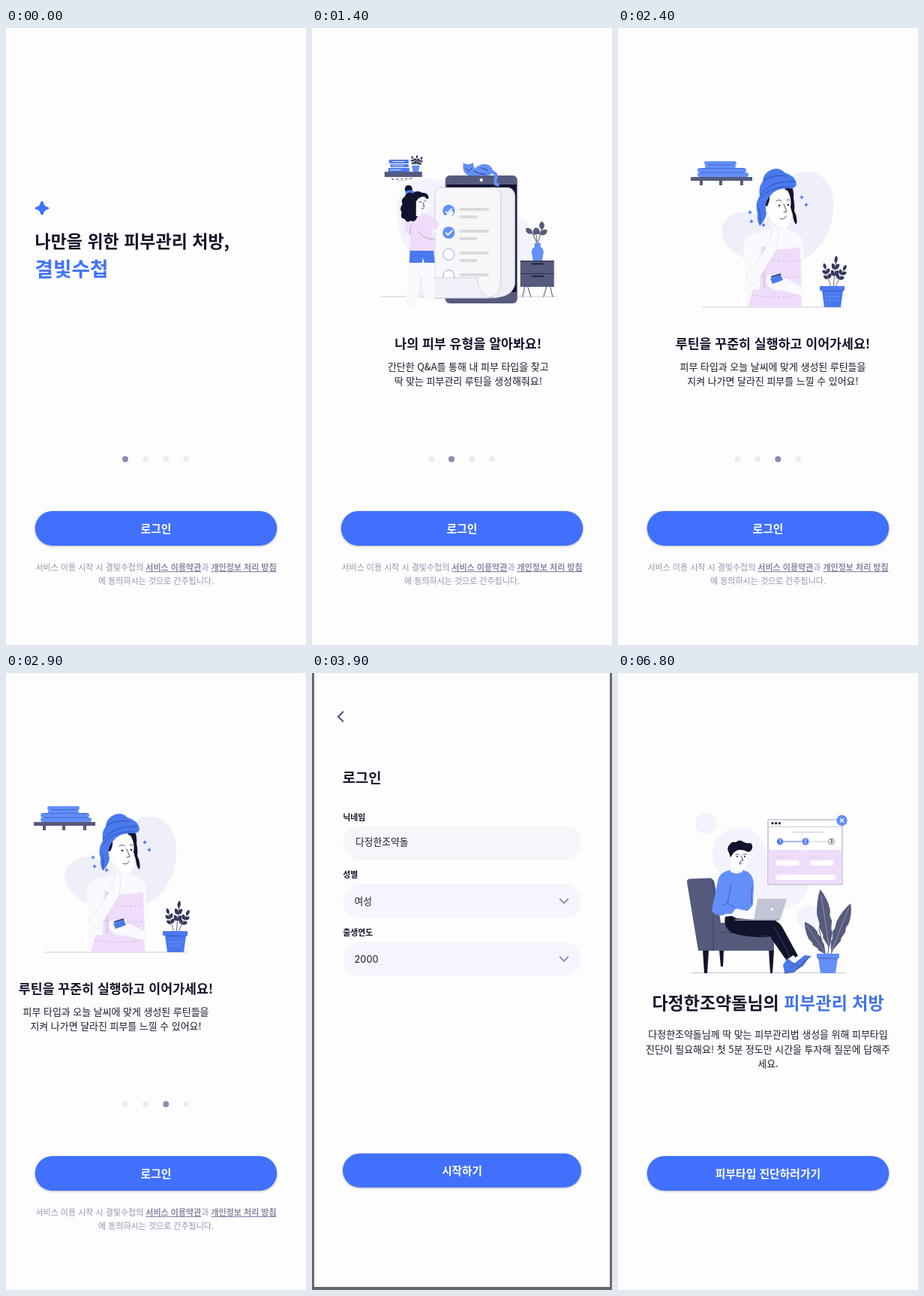
Recreate the animation shown at these times as an HTML page. Size 400 px wide and 820 px high, loop 7.9 s.

```html
<!DOCTYPE html>
<html lang="ko">
<head>
<meta charset="utf-8">
<style>
html, body { margin: 0; width: 100%; height: 100%; overflow: hidden; background: #fdfdfd }
svg { display: block; width: 100%; height: 100% }
text { font: 12.95px "Noto Sans CJK KR", "Noto Sans CJK", sans-serif; fill: #1b1b2e }
.mid text, .btn text { text-anchor: middle }
text.big { font-size: 23px; font-weight: 700; fill: #14142b }
text.brand { font-size: 26.6px; font-weight: 700; fill: #4173fb }
text.head { font-size: 17.3px; font-weight: 700; fill: #14142b }
text.label { font-size: 11px; font-weight: 700; fill: #14142b }
text.num { font-family: Inter, sans-serif }
.step text { font: 700 6px Inter, sans-serif }
.terms text { font-size: 11px; fill: #9294ad }
.terms tspan { font-weight: 700; text-decoration: underline; fill: #8688a6 }
.btn use { fill: #4171fc; filter: drop-shadow(0 1.5px 1.5px #0004) }
.btn text { font-size: 14.8px; font-weight: 700; fill: #fff }
.blue { fill: #638ffa } .royal { fill: #4a79ee } .slate { fill: #565a7d } .ink { fill: #10132b }
.pale { fill: #f2f3fc } .skin { fill: #f9f9fe } .lav { fill: #efdcfa } .white { fill: #fff }
.gray { fill: #d9d9de } .card { fill: #f7f7fa }
.line { fill: none; stroke: #b2b4c0; stroke-width: .7 }
.thin { fill: none; stroke: #22253f; stroke-width: .8; stroke-linecap: round; stroke-linejoin: round }
.edge { stroke: #b4b6c6; stroke-width: .6 }
.chev { fill: none; stroke: #8487b3; stroke-width: 1.8; stroke-linecap: round; stroke-linejoin: round }
#menu rect { fill: #f9f9fb; filter: drop-shadow(0 6px 9px #0007) }
</style>
</head>
<body>
<svg viewBox="0 0 400 820">
<defs>
  <path id="leaf" d="M0 0C-5 -3 -5 -8 0 -11C4 -8 4 -3 0 0"/>
  <g id="sprig">
    <path d="M0 0V-36" fill="none" stroke="#3d4163"/>
    <g fill="#34385a">
      <use href="#leaf" transform="translate(0 -34)"/>
      <use href="#leaf" transform="translate(0 -26) rotate(-48)"/><use href="#leaf" transform="translate(0 -26) rotate(48)"/>
      <use href="#leaf" transform="translate(0 -17) rotate(-52)"/><use href="#leaf" transform="translate(0 -17) rotate(52)"/>
    </g>
  </g>
  <g id="blade">
    <path class="slate" d="M0 0L-8 -12L-7 -15L-12 -24L-10 -27L-12 -36Q-10 -50 0 -62Q11 -50 11 -38L9 -34L11 -28L8 -20L9 -16Z"/>
    <path d="M0 0V-56" fill="none" stroke="#b9bccf" stroke-width=".6"/>
  </g>
  <path id="spark" d="M0 -3L1 -1L3 0L1 1L0 3L-1 1L-3 0L-1 -1Z" class="royal"/>
  <rect id="pill" x="38.700" y="642" width="322.600" height="46" rx="23"/>
</defs>

<g id="intro">
  <rect y="-22" width="400" height="844" fill="#fdfdfd"/>
  <g id="slides">
    <g>
      <path fill="#4173fb" d="M48 230C50 230 50.500 235 52 236C53 237.500 57.500 238 57.500 239.500C57.500 241 53 241.500 52 243C50.500 244 50 248.500 48 248.500C46 248.500 45.500 244 44 243C43 241.500 38.500 241 38.500 239.500C38.500 238 43 237.500 44 236C45.500 235 46 230 48 230"/>
      <text class="big" x="38.500" y="291.700">나만을 위한 피부관리 처방,</text>
      <text class="brand" x="38.500" y="330">결빛수첩</text>
    </g>

    <g class="mid" transform="translate(391.500)">
      <path class="pale" d="M114 245C112 200 150 195 180 205V310H150C125 305 115 275 114 245M274 254C292 250 298 285 291 309H274Z"/>
      <path class="line" d="M92 357H326"/>
      <path class="slate" d="M97 191h50v7h-50z"/>
      <path class="line" d="M104 198Q119 208 136 198"/>
      <path d="M108 201L134 200" stroke="#565a7d" stroke-width="2" stroke-dasharray="0 6" stroke-linecap="round"/>
      <path class="royal" d="M103 175h26v5h-26zM105 181h24v4h-24zM102 186h28v5h-28z"/>
      <path d="M107 177.500h17M108 183h15M105 188.500h14" stroke="#dfe4fb"/>
      <use href="#sprig" transform="translate(139 187) rotate(-18) scale(.4)"/><use href="#sprig" transform="translate(139 187) rotate(28) scale(.4)"/><use href="#sprig" transform="translate(139 187) rotate(5) scale(.4)"/>
      <path class="blue" d="M133 183h11l-2 8h-7z"/>

      <rect class="slate" x="178" y="196" width="96" height="170" rx="6"/>
      <path class="ink" d="M180 208H273V351H180Z"/>
      <circle class="white" cx="226" cy="202" r="2.200"/>
      <path class="edge" fill="#eeeef6" d="M240 212H262Q271 214 271 224V340Q268 358 240 359Z"/>
      <path class="card edge" d="M164 222Q164 212 174 212H244Q252 214 252 224V338Q252 356 234 359H164Z"/>
      <g class="gray">
        <path d="M197 239h39v4h-39zM197 249h23v4h-23zM197 268h39v4h-39zM197 278h23v4h-23zM197 297h39v4h-39zM197 307h23v4h-23zM197 326h39v4h-39z"/>
      </g>
      <circle class="blue" cx="182.500" cy="243" r="8"/><circle class="blue" cx="182.500" cy="272" r="8"/>
      <path d="M178.500 272l3 3 6-6M178 244l3 2 6-6" fill="none" stroke="#fff" stroke-width="1.800"/>
      <circle cx="182.500" cy="301" r="7.500" fill="#fff" stroke="#7c9df6" stroke-width=".9"/>
      <path d="M175.500 332A7.500 7.500 0 1 1 189.500 332" fill="#fff" stroke="#7c9df6" stroke-width=".9"/>
      <path class="edge" fill="#f0f0f8" d="M135 332H221V338Q224 355 240 359H150Q136 352 135 332Z"/>
      <path d="M240 191Q248 194 245 201Q243 208 248 208" fill="none" stroke="#638ffa" stroke-width="4.500" stroke-linecap="round"/>
      <path class="blue" d="M202 179l4 2h5l4-2 2 8C226 178 238 180 241 188Q242 195 234 196H209Q200 193 202 179"/>
      <path class="thin" d="M205 187l2 1M211 188l2-1M208 190h2M216 190Q224 195 232 194M226 186l8 3"/>

      <path class="thin" d="M284 344L281 357M288 344L292 357M313 344L309 357M318 344L321 357"/>
      <path class="slate" d="M278 309h45v35h-45z"/>
      <path d="M278 326.500h45M278 310h45" stroke="#2c2f4d"/>
      <path d="M293 313.500h16M293 330h16" stroke="#10132b" stroke-width="1.500"/>
      <path class="thin" d="M301 288L292 268M301 288L307 264M300 284L299 273"/>
      <g class="slate"><use href="#leaf" transform="translate(294 273) rotate(-50)"/><use href="#leaf" transform="translate(296 275) rotate(30)"/><use href="#leaf" transform="translate(305 275) rotate(55)"/><use href="#leaf" transform="translate(307 268)"/><use href="#leaf" transform="translate(304 274) rotate(-40)"/></g>
      <path class="blue" d="M297 286h8v5q4 2 4 7l-2 11h-12l-2-11q0-5 4-7z"/>

      <path class="skin" d="M131 308L125 364L127 371H141L140 365L146 320L151 361L163 364L164 308Z"/>
      <path class="royal" d="M131 293L130 312H147L148 305L150 312H164L162 293Z"/>
      <path class="lav" d="M131 248Q122 256 124 270L131 274V296H163L160 262L165 270L171 263Q160 246 151 247Z"/>
      <path class="skin" d="M163 270L170 262L176 250L183 246L187 242L189 246L178 260L168 274Z"/>
      <path class="thin" stroke-opacity=".35" d="M131 274Q130 268 133 262M141 270Q150 281 163 281"/>
      <path class="ink" d="M156 226Q155 218 147 219Q141 215 135 219Q126 217 124 224Q118 228 121 234Q116 240 120 245Q117 253 124 254Q127 260 132 256Q138 259 140 252Q146 245 140 237L150 229Z"/>
      <path class="skin" d="M139 231Q142 224 150 224Q154 226 155 236L154 244L146 245V250H139Z"/>
      <path class="thin" d="M143 231h3M150 230h2M148 232l2 5h-2M146 240q3 1 4-1"/>
      <circle class="ink" cx="129" cy="214" r="5"/><path d="M125 219q6-4 11 0" fill="none" stroke="#4a79ee" stroke-width="3"/>

      <text class="head" x="208.500" y="425.500">나의 피부 유형을 알아봐요!</text>
      <text x="208.500" y="454.800">간단한 Q&amp;A를 통해 내 피부 타입을 찾고</text>
      <text x="208.500" y="473.800">딱 맞는 피부관리 루틴을 생성해줘요!</text>
    </g>

    <g class="mid" transform="translate(793.500)">
      <path fill="#eeeff9" d="M214 225C222 180 282 178 287 228C291 276 259 311 228 312C185 316 142 305 138 270C140 242 178 236 196 258Z"/>
      <path class="line" d="M112 371H301"/>
      <path class="slate" d="M97 198h82v5H97zM109 203h4v6h-4zM135 203h4v6h-4zM163 203h4v6h-4z"/>
      <g class="blue"><rect x="106" y="192" width="68" height="6" rx="3"/><rect x="106" y="186" width="65" height="6" rx="3"/><rect x="116" y="181.500" width="41" height="5" rx="2.500"/><rect x="115" y="177" width="43" height="5" rx="2.500"/></g>
      <path d="M110 192h59M120 181.700h34M112 186.500h56" stroke="#3b5fc4" stroke-width=".8"/>

      <path class="skin" d="M171 371L168 290Q169 276 184 273L205 268V254H225V268L236 272Q247 276 247 290V371Z"/>
      <path class="lav" d="M191 289Q215 298 243 291L245 371H173L180 348H189Z"/>
      <g class="thin" stroke-opacity=".25"><path d="M190 305q25 8 54 3M186 328q20 6 58 2M178 354q30 8 66 0" stroke-dasharray="2 4"/><path d="M195 292v54"/></g>
      <path class="skin edge" d="M170 330Q178 342 184 340L211 296L214 270L208 259L204 276L198 290L184 312Z" stroke-opacity=".5"/>
      <path class="skin" d="M198 330Q210 325 222 332L246 344V356L220 349Q204 350 198 340Z"/>
      <path class="royal" d="M203 333l14-5 3 7-14 5z"/><path d="M204 331l13-4" stroke="#29408d" stroke-width="2"/>
      <path class="ink" d="M222 211L232 211Q235 218 234 226Q236 236 235 243Q240 252 238 261Q234 259 233 248L228 232Z"/>
      <path class="white" d="M199 221Q210 209 226 216Q232 226 230 238Q233 252 228 262Q222 267 214 263Q203 257 200 246Q192 249 193 238Q195 234 199 237Z"/>
      <path class="ink" d="M196 224L202 221Q203 229 199 237L194 236Z"/>
      <path class="thin" d="M211 230q4-3 7 0M225 229q3-2 4 0M221 234l4 10-4 1M216 253q5 3 8-3"/>
      <circle class="ink" cx="215" cy="236" r="1.200"/><circle class="ink" cx="227" cy="235" r="1.200"/>
      <path class="royal" d="M189 263Q185 255 186 246Q182 234 189 223Q187 211 193 204Q194 193 203 189Q214 184 222 192Q236 196 238 207Q237 214 228 213Q211 212 203 223Q194 233 198 246Q197 255 189 263Z"/>
      <path d="M189 222Q204 202 236 204M193 204Q205 194 224 197M190 226Q204 209 230 211M188 240Q191 252 189 261" fill="none" stroke="#2c4ba8" stroke-width=".9"/>
      <use href="#spark" x="176" y="245"/><use href="#spark" x="178" y="257"/><use href="#spark" x="194" y="262"/><use href="#spark" x="245" y="225"/><use href="#spark" x="251" y="235"/>

      <use href="#sprig" transform="translate(284 345) rotate(-16) scale(.62 .75)"/><use href="#sprig" transform="translate(287 345) rotate(6) scale(.62 .95)"/><use href="#sprig" transform="translate(289 345) rotate(27) scale(.62 .75)"/>
      <path class="royal" d="M269 343h33v6h-2l-3 22h-22l-3-22h-3z"/><path d="M272 349.500h28" stroke="#3559c0"/><path d="M277 357h18M278 362h16" stroke="#86a9ff" stroke-dasharray="2 2"/>

      <text class="head" x="206.500" y="425.500">루틴을 꾸준히 실행하고 이어가세요!</text>
      <text x="206.500" y="454.800">피부 타입과 오늘 날씨에 맞게 생성된 루틴들을</text>
      <text x="206.500" y="473.800">지켜 나가면 달라진 피부를 느낄 수 있어요!</text>
    </g>

    <g class="mid" transform="translate(1185)">
      <path class="pale" d="M208 208C210 143 304 140 314 205C318 250 295 290 274 320H150C115 310 110 245 150 233C180 228 196 244 208 208"/>
      <path class="line" d="M104 362H331"/>
      <path d="M269 241A26 26 0 1 1 278 250L266 249Q270 246 269 241" fill="#f6f6fd" stroke="#a0a2b2" stroke-width=".8"/>
      <path class="royal" d="M287 216q4-3 8 0l-2 18h-4z"/><circle class="royal" cx="291" cy="238.500" r="3"/>
      <circle cx="126" cy="247" r="12" fill="#f7f7fd" stroke="#737797" stroke-width="2.400"/>
      <path d="M122 247l3 4 5-9M113 237q2-4 6-4M133 233q5 1 6 5M111 252q1 4 4 6" fill="none" stroke="#565a7d" stroke-width="1.500"/>
      <path class="white edge" d="M129 249h40v44l-8-6h-32z"/><path class="royal" d="M129 247h40v14h-40z"/>
      <path d="M143 243v9M155 243v9" stroke="#8d90aa" stroke-width="3" stroke-linecap="round"/>
      <text x="149" y="279" style="font:800 17px Inter,sans-serif">17</text>

      <path class="blue" d="M154 362L166 330Q173 290 187 281Q200 274 215 277H240Q258 280 261 296L264 362Z"/>
      <path class="lav" d="M219 306L238 296L240 362H222Z"/>
      <path class="skin" d="M209 268L213 284L224 307L237 298L236 262Z"/>
      <path class="ink" d="M192 222C187 212 196 204 204 208C209 202 220 202 223 208C232 206 241 214 238 221C247 225 247 235 243 240C250 245 249 256 244 260C247 270 240 278 235 273Q229 276 225 268L200 266C199 278 190 281 186 276C178 281 172 271 178 264C172 256 176 248 179 245C173 235 179 226 185 226Q187 221 192 222Z"/>
      <path class="white" d="M193 231Q207 237 217 222Q220 232 227 237Q231 247 226 255Q223 273 210 273Q195 268 192 250Z"/>
      <path class="thin" d="M196 240q4-3 6 0M212 238q5-3 7 0M204 241l-3 11 4 1"/>
      <circle class="ink" cx="199" cy="244" r="1.500"/><circle class="ink" cx="215" cy="242" r="1.500"/><circle cx="211" cy="258" r="2.800" fill="#d9dae6" stroke="#22253f"/>
      <path class="skin" d="M236 286Q242 275 248 275Q256 276 258 281L259 289L263 295L253 298L247 293L239 296Z"/>
      <path class="thin" stroke-opacity=".5" d="M206 280L216 301M240 300L242 362M178 330Q178 348 166 358"/>
      <path d="M175 303q9-9 15 0t12-2M244 310q9-7 13 2M180 344q9-3 9-14" fill="none" stroke="#c8d7ff" stroke-width=".8"/>
      <rect class="ink" x="203" y="309" width="19" height="34" rx="3" transform="rotate(3 212 326)"/>
      <circle cx="207" cy="314" r="1.300" fill="#7b7f98"/>
      <path class="skin" d="M165 359L182 341L197 331L203 321L207 325L204 335L218 329L223 334L222 342L208 353L188 362H166Z"/>
      <path class="thin" stroke-opacity=".3" d="M208 338l14-7M208 343l14-5M207 347l12-4"/>
      <path class="edge" fill="#d7d8e8" d="M211 365H256L259 376H250Z"/>
      <path fill="#e9eaf6" stroke="#858799" stroke-width=".8" d="M262 321Q262 319 265 318.500L328 315Q331 315 330.500 318L322 371Q321 373 318 373.500L253 376.500Z"/>
      <circle class="white" cx="293.500" cy="344" r="3.200" stroke="#a5a7b9" stroke-width=".7"/>

      <text class="head" x="215" y="425.500">결빛수첩으로 습관을 들여요!</text>
      <text x="215" y="454.800">루틴 시간에 울리는 리마인더 알림으로 잊지 않고</text>
      <text x="215" y="473.800">루틴을 수행할 수 있도록 도와줘요.</text>
    </g>
  </g>
  <g id="dots"><circle cx="159" cy="573" r="4"/><circle cx="186" cy="573" r="4"/><circle cx="213.300" cy="573" r="4"/><circle cx="240.300" cy="573" r="4"/></g>
  <g class="btn"><use href="#pill"/><text x="200" y="670.500">로그인</text></g>
  <g class="mid terms">
    <text x="200" y="721">서비스 이용 시작 시 결빛수첩의 <tspan>서비스 이용약관</tspan>과 <tspan>개인정보 처리 방침</tspan></text>
    <text x="200" y="739">에 동의하시는 것으로 간주됩니다.</text>
  </g>
</g>

<rect class="scrim" width="400" height="820"/>
<g id="login">
  <rect y="-22" width="400" height="844" fill="#fdfdfd"/>
  <path class="chev" style="stroke:#4a4e78;stroke-width:2" d="M39 46.500L32.500 53L39 59.500"/>
  <text x="38.500" y="142.300" style="font-size:19px;font-weight:700">로그인</text>
  <text class="label" x="39" y="192.600">닉네임</text>
  <text class="label" x="39" y="270">성별</text>
  <text class="label" x="39" y="348.200">출생연도</text>
  <rect x="39" y="201" width="322" height="45.500" rx="22.700" fill="#f6f6fa"/>
  <rect x="39" y="278.500" width="322" height="46.500" rx="23" fill="#f5f6fd"/>
  <rect x="39" y="357" width="322" height="46.500" rx="23" fill="#f5f6fd"/>
  <text x="56" y="226.500">다정한조약돌</text>
  <text x="54.500" y="306.500">여성</text>
  <text class="num" x="54.500" y="385">2000</text>
  <path class="chev" d="M332.500 299l5.500 5.500 5.500-5.500M332.500 377l5.500 5.500 5.500-5.500"/>
  <g class="btn"><use href="#pill"/><text x="200" y="670.500">시작하기</text></g>
  <g id="menu">
    <rect x="39" width="322" rx="27"/>
    <g><text x="54.500" y="259">남성</text><text x="54.500" y="306">여성</text></g>
  </g>
</g>

<rect class="scrim" width="400" height="820"/>
<g id="result" class="mid">
  <rect y="-22" width="400" height="844" fill="#fdfdfd"/>
  <g class="pale"><circle cx="117" cy="200" r="14"/><circle cx="162" cy="241" r="36"/><circle cx="216" cy="275" r="39"/><circle cx="254" cy="325" r="16"/></g>
  <path class="line" d="M98 398.500H303"/>
  <path class="white" stroke="#85889b" stroke-width=".8" d="M200 195h99v86h-99z"/>
  <path class="lav" d="M200.400 235h98.200v45.600h-98.200z"/>
  <path class="line" d="M200 204.500h99M231 211.500h43M250 224h34"/>
  <path d="M216 224h34" stroke="#4a79ee"/>
  <g class="ink"><circle cx="206" cy="199.700" r="1.600"/><circle cx="210.700" cy="199.700" r="1.600"/><circle cx="215.400" cy="199.700" r="1.600"/></g>
  <circle class="royal" cx="216" cy="224" r="4.200"/><circle cx="250" cy="224" r="5.800" fill="#cddaff"/><circle class="royal" cx="250" cy="224" r="4.200"/>
  <circle class="white" cx="284.500" cy="224" r="4" stroke="#565a7d" stroke-width=".7"/>
  <g class="step"><text x="216" y="226.300" style="fill:#fff">1</text><text x="250" y="226.300" style="fill:#fff">2</text><text x="284.500" y="226.300">3</text></g>
  <path class="white" d="M247 236l3-3 3 3z"/>
  <g class="white"><rect x="210" y="249" width="32" height="7" rx="3.500"/><rect x="256" y="249" width="32" height="7" rx="3.500"/><rect x="210" y="268" width="80" height="7" rx="3.500"/></g>
  <path class="line" stroke-opacity=".6" d="M211 245h13M259 245h13M211 264h13"/>
  <circle class="blue" cx="298.500" cy="196" r="7.200"/><path d="M296 193.500l5 5m0-5l-5 5" stroke="#fff" stroke-width="1.500"/>

  <path class="ink" d="M113 368h8l-2 31h-4zM135 368h6l-1 22h-3zM201 368h7l-2 31h-3z"/>
  <path class="slate" d="M92 278Q91 274 96 273.500L122 272.500Q128 273 129 280L137 332H208V367Q208 369 205 369H107Z"/>
  <path class="thin" d="M127 320V369M123 274Q126 276 127 284L133 326M137 345H207" stroke-opacity=".6"/>
  <path class="ink" d="M143 324Q165 319 205 327Q216 330 222 343L240 376L226 384L203 351Q170 352 151 345Q140 337 143 324Z"/>
  <path d="M205 351L190 349M208 337L230 378" fill="none" stroke="#484c68" stroke-width=".8"/>
  <path class="skin" d="M225 381l9-6 4 5-9 8z"/>
  <path class="royal" d="M220 388L226 379L235 386L249 375L256 376L247 389L233 398H222Z"/>
  <path d="M222 399L235 397L257 376M228 391l6-2M232 385l7 3" fill="none" stroke="#565a7d" stroke-width="1.300"/>
  <path class="blue" d="M125 316L133 276Q136 264 149 262L166 262Q179 264 181 279L180 308L170 320H145Q132 326 125 316Z"/>
  <path class="thin" stroke-opacity=".5" d="M151 280L146 306L157 313M146 306L139 309M179 283Q177 296 178 306"/>
  <path class="skin" d="M151 246L150 264Q158 269 166 264V255Z"/>
  <path class="white" d="M149 234H173L172 254Q169 263 161 262Q152 259 151 249L147 246Q145 240 149 239Z"/>
  <path class="ink" d="M150 245L148 239Q144 232 149 228Q152 223 157 225Q162 220 168 225Q173 227 177 226Q181 230 178 235Q175 240 169 236Q163 234 158 236L154 239Z"/>
  <path class="thin" d="M157 241h4M167 241h4M164 243l3 6h-3"/><circle class="ink" cx="159" cy="244" r="1"/><circle class="ink" cx="169" cy="244" r="1"/><circle cx="163" cy="252.500" r="1.400" fill="#fff" stroke="#22253f" stroke-width=".8"/>
  <path class="skin" d="M157 313L172 316L181 315L187 322L181 328L158 326L150 322Z"/>
  <path d="M186 300H222Q225 300 224.500 302L217 326Q216 328.500 213 328.500H181Z" fill="#c3c5d6"/><path d="M156 328.300h58" stroke="#999cb3" stroke-width="1.500"/>
  <circle class="white" cx="205" cy="314" r="1.700"/>

  <path class="thin" d="M276 374L268 340M280 374L282 346M284 374L294 348"/>
  <use href="#blade" transform="translate(282 366) rotate(-9) scale(.8 1.280)"/><use href="#blade" transform="translate(284 371) rotate(22) scale(.7 1.130)"/><use href="#blade" transform="translate(277 374) rotate(-33) scale(.65 .83)"/>
  <path class="blue" d="M265 373h30v6h-2l-3 20h-20l-3-20h-2z"/><path d="M267 379.300h26" stroke="#3c62cc"/>

  <text class="big" x="200" y="446.700">다정한조약돌님의 <tspan fill="#4173e8">피부관리 처방</tspan></text>
  <text x="200" y="485">다정한조약돌님께 딱 맞는 피부관리법 생성을 위해 피부타입</text>
  <text x="200" y="504.500">진단이 필요해요! 첫 5분 정도만 시간을 투자해 질문에 답해주</text>
  <text x="200" y="524">세요.</text>
  <g class="btn"><use href="#pill"/><text x="200" y="670.500">피부타입 진단하러가기</text></g>
</g>
</svg>
<script>
const LOOP = 7900, STEP = 100;
const SWIPES = [880, 1855, 2843];
const $ = q => document.querySelector(q);
const pages = ['#intro', '#login', '#result'].map($);
const scrims = document.querySelectorAll('.scrim');
const dots = [...$('#dots').children];
const [menuBox, menuItems] = $('#menu').children;

const ramp = (t, a, b) => Math.min(1, Math.max(0, (t - a) / (b - a)));
const smooth = u => u * u * (3 - 2 * u);

function bezier(x1, y1, x2, y2, x) {
  const at = (a, b, s) => 3 * a * s * (1 - s) ** 2 + 3 * b * s * s * (1 - s) + s ** 3;
  let lo = 0, hi = 1;
  for (let i = 0; i < 24; i++) {
    const s = (lo + hi) / 2;
    if (at(x1, x2, s) < x) lo = s; else hi = s;
  }
  return at(y1, y2, lo);
}

// Critically damped spring from 0 to 1
function spring(ms) {
  const z = Math.max(0, ms) * .01115;
  return 1 - (1 + z) * Math.exp(-z);
}

function zoomCurve(u) {
  const k = 1 / 6;
  return u < k ? .4 * bezier(.05, 0, .1333, .06, u / k)
               : .4 + .6 * bezier(.2083, .82, .25, 1, (u - k) / (1 - k));
}

function scale(el, s) {
  el.setAttribute('transform', `translate(200 400) scale(${s}) translate(-200 -400)`);
}

// The next page zooms in over the current one, which is dimmed
function openPage(i, t, start) {
  const u = ramp(t, start, start + 300), z = u && zoomCurve(u);
  if (u > 0) scale(pages[i - 1], 1 + .05 * z);
  scale(pages[i], .85 + .15 * z);
  pages[i].setAttribute('opacity', ramp(u, .125, .25));
  scrims[i - 1].setAttribute('opacity', .6 * ramp(u, .2075, .4175));
}

function drawMenu(t) {
  const grow = smooth(ramp(t, 4860, 4960)), gone = ramp(t, 5560, 5640);
  const top = 278 - 56 * grow, bottom = 325 + 6 * grow;
  menuBox.setAttribute('y', top);
  menuBox.setAttribute('height', bottom - top);
  menuItems.setAttribute('opacity', ramp(t, 4880, 4980));
  $('#menu').setAttribute('opacity', ramp(t, 4800, 4880) * (1 - gone));
}

function draw(now) {
  const t = Math.floor(now % LOOP / STEP) * STEP;
  const pos = SWIPES.reduce((sum, s) => sum + spring(t - s), 0);
  $('#slides').setAttribute('transform', `translate(${-400 * pos})`);
  dots.forEach((d, i) => d.setAttribute('fill', i === Math.round(pos) ? '#888db4' : '#ebecf6'));
  scale(pages[0], 1);
  openPage(1, t, 3768);
  openPage(2, t, 6490);
  drawMenu(t);
}

const begin = performance.now();
(function tick() {
  draw(performance.now() - begin);
  requestAnimationFrame(tick);
})();
</script>
</body>
</html>
```
